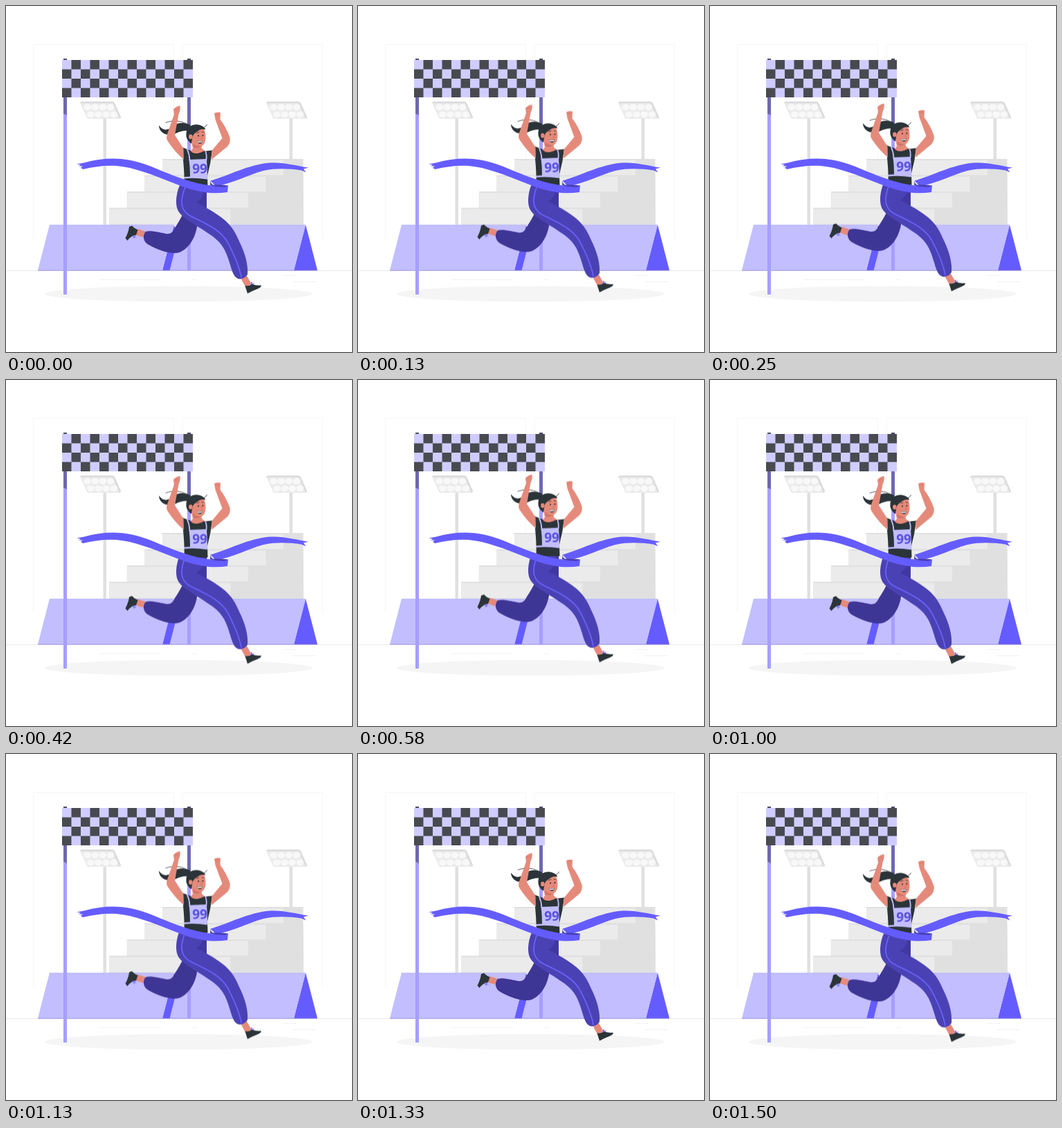
Animation, 500 px wide and 500 px high, one loop 1.54 s. Source, as an HTML page:

```html
<!DOCTYPE html>
<html lang="en">
<head>
<meta charset="utf-8">
<title>Finish line</title>
<style>
  html, body { margin: 0; width: 100%; height: 100%; overflow: hidden; background: #fff; }
  svg { display: block; width: 100vw; height: 100vh; }
  #runner { animation: bob 770ms linear -65ms infinite alternate; }
  @keyframes bob {
    from { transform: translateY(.8px); }
    to { transform: translateY(-9.2px); }
  }
  .skin { fill: #e58a7b; }
  .ink { fill: #2b3438; }
  .violet { fill: #655cff; }
  .pale { fill: #c2beff; }
  .line { fill: none; stroke-linecap: round; stroke-linejoin: round; }
  .bib { font: 700 19px "Noto Sans", "Open Sans", sans-serif; font-stretch: extra-condensed; text-anchor: middle; fill: #5a51da; }
</style>
</head>
<body>
<svg viewBox="0 0 500 500">
  <defs>
    <g id="lamp">
      <path fill="#e0e0e0" d="M140.5 160h4.5v156h-4.5z"/>
      <path fill="#dcdcdc" d="M107 139.5l2-1.5h45.500l2.500 2 9.500 21.500-2.500 1.500H118z"/>
      <path fill="#ebebeb" d="M107.500 140.500h46.500l10 22.500h-46z"/>
      <g id="bulbs" fill="#f8f8f8"></g>
    </g>
    <clipPath id="upper"><path d="M140 130h6v91h-6zM100 130h70v34h-70z"/></clipPath>
  </defs>

  <!-- backdrop -->
  <g fill="none" stroke="#f6f6f6">
    <path d="M39.500 337V55.500h203V337M255.500 337V55.500h202V337"/>
    <path stroke="#ebebeb" d="M0 382.500h500"/>
    <path stroke="#f2f2f2" d="M134 395.500h90M269 395.500h7M400 389.500h20M415 398.500h33"/>
  </g>
  <ellipse cx="249.500" cy="416" rx="193.500" ry="11.300" fill="#f5f5f5"/>
  <use href="#lamp"/>
  <g transform="translate(269)"><use href="#lamp" clip-path="url(#upper)"/></g>
  <g id="stand"></g>

  <!-- barrier -->
  <path class="violet" d="M243 316l17 66h-34zM433 316l17 66h-34z"/>
  <path class="pale" d="M63 316h180l-17 66H46zM253.500 316H433l-17 66H236.500z"/>
  <path stroke="#8e87df" stroke-width=".8" d="M46 382.200h404"/>

  <!-- gate -->
  <path fill="#a69fff" d="M262 76h5v306h-5zM83 76h5v341h-5z"/>
  <path fill="#6f68b0" d="M262 76h5v104h-5zM83 76h5v82l-5-2.500z"/>
  <path fill="#4b4b68" d="M262 76h5v3h-5zM83 76h5v3h-5z"/>
  <path fill="#d0ccff" d="M81 78h189v54H81z"/>
  <path id="checks" fill="#484a50"/>

  <g id="runner">
    <!-- ponytail -->
    <path class="ink" d="M266 172C256 167 247 169 241 174C234 180 227 181 221 172.500C221 180 227 186 236 186C247 186 252 178 265 181z"/>
    <path class="line" stroke="#2b3438" stroke-width=".8" d="M231 168.500C243 164 256 166 265 173"/>

    <!-- back leg -->
    <path class="skin" d="M190 322l12 4-2 9-12-4z"/>
    <path class="ink" d="M182 317.500Q186 322 190.500 323.500L188 331Q181 331.500 175.500 339L172.500 335.500Q177 327 178 319z"/>
    <path class="line" stroke="#655cff" stroke-width=".9" d="M183 331.500l2 4 .5-4 2 3"/>
    <path fill="#3e3695" d="M258 296Q250 312 244 320.500C241 327 238 330 231 329C220 327 208 324 202 326C197 331 198 341 206 345C222 354 240 360 252 355.500C264 350 275 335 277 312z"/>

    <!-- front leg -->
    <path class="skin" d="M339 393l9-3 7 12-9 4z"/>
    <path class="ink" d="M345.500 404.500Q352 405 355.500 401.500Q361 404.500 368.500 403.500Q370 406 363 409Q355 412 349 415.500z"/>
    <path class="line" stroke="#655cff" stroke-width=".9" d="M354 403l1-4 1.500 3.500 2-2"/>
    <path fill="#4a42b4" d="M251 259C245 273 244 290 250 298C257 308 276 317 296 331C312 342 318 353 324 374C328 389 332 395 339 394.500Q346 393 349 388C350 374 346 358 337 340C328 319 320 309 290 292L290 259z"/>
    <path fill="#4038a0" d="M290 262l-.5 30Q281 286 274 284Q284 281 287 262z"/>
    <path class="line" stroke="#6b63ff" stroke-width="1.700" d="M259 261C252 280 251 293 264 302C284 313 308 321 320 341C330 360 337 376 340 392"/>

    <!-- torso -->
    <path class="skin" d="M268 196h14l1 10 7 5-12 10-12-11 4-4z"/>
    <path class="ink" d="M254 204L266 208.500Q272 217 285 210L298 208.500Q296 227 291 245L291.500 262H257.500Q258 250 257 235Q256 218 254 204z"/>
    <path class="pale" d="M264.500 222L290 221Q291 235 291 250.500Q272 247.500 257 249.500L257 247L266 246.500Q266 233 264.500 222z"/>
    <path class="line" stroke="#c2beff" stroke-width="1.800" d="M262 207.500Q265 214 265.500 223M288.500 210.500Q290.500 216 289.300 223"/>
    <text class="bib" x="280" y="242.500">99</text>

    <!-- arms -->
    <path class="skin" d="M257 222Q244 211 233.500 195Q231 191 233 185L243 156.500L242 149.500Q245 145 251.500 144Q252.500 150 249.500 156L244 186.500L256.500 206z"/>
    <path class="skin" d="M297 222L320 203Q325 197 323.500 190Q318 175 309.500 164L310 154Q305 152.500 301 155L302.500 164L312.500 191L297.500 209z"/>
    <path class="line" stroke="#d0705f" stroke-width=".6" d="M244 150.500l5-2M303 157.500l5-1"/>

    <!-- head -->
    <path class="skin" d="M264 183Q267 173 280 174Q288 176 288.500 188Q289 199 283 202.500Q276 204 268.500 196z"/>
    <path fill="#cf7466" d="M270.500 198.500Q275 203 281 203Q277 207 271 204z"/>
    <path class="ink" d="M268 199Q259 193 260.500 183Q263 171 276 171.200Q285 172 288.500 178.500Q281 177 277 181Q271 184 269.500 189z"/>
    <ellipse class="skin" cx="266.800" cy="189" rx="2.700" ry="3.400"/>
    <path class="line" stroke="#2b3438" stroke-width=".8" d="M285 176Q289 175 290.500 171.500M275.500 183.500l3.500-1.300M283 182l2.700.6"/>
    <g class="ink">
      <ellipse cx="278" cy="187.500" rx=".9" ry="1.300"/>
      <ellipse cx="284.500" cy="187" rx=".9" ry="1.300"/>
      <path d="M275.500 194.500Q280 196.500 284 194.500Q283 199.500 279.500 199Q276.500 198 275.500 194.500z"/>
    </g>
    <path fill="#fff" d="M276 195Q280 196.800 283.500 195L283 196.800Q279.500 198 276.800 196.800z"/>
    <path class="line" stroke="#cf6556" stroke-width=".7" d="M282 187.500l1.500 4.500-2 .3"/>
  </g>

  <!-- ribbon -->
  <path class="violet" d="M102 228.500L113 226.500C150 216 180 220 210 232C245 247 278 259 300 259.500L321 259.500L320 269C296 273 272 268 245 257C212 244 185 233 160 231C143 230 128 232 111 236L108 233.500L111 231.500L105 231.500L108 229.500z"/>
  <path class="violet" d="M295.500 252.500C322 245 350 229 382 226.500C402 225.500 420 231 437 233.500L430 235.500L433.500 240.500L427 237.500C410 235 390 234 372 238C347 245 327 257 303 260z"/>
  <path fill="#473fb4" d="M295.500 252.500Q296 257 299 258.500Q310 257.500 321 259.500L316 261.500Q305 262 295 259z"/>
</svg>
<script>
  const $ = id => document.getElementById(id);
  const range = n => [...Array(n).keys()];
  const rect = (x, y, w, h, fill) =>
    `<rect x="${x}" y="${y}" width="${w}" height="${h}" fill="${fill}"/>`;

  // checkered banner: 14 x 4 cells
  const cell = 13.5;
  $('checks').setAttribute('d', range(56)
    .map(i => [i % 14, Math.floor(i / 14)])
    .filter(([c, r]) => (c + r) % 2)
    .map(([c, r]) => `M${81 + c * cell} ${78 + r * cell}h${cell}v${cell}h${-cell}z`)
    .join(''));

  $('stand').innerHTML = range(4).map(i => {
    const x = 226 - i * 25.6, y = 221 + i * 23.5;
    return rect(x, y, 429.5 - x, 316 - y, '#e0e0e0') + rect(x, y + 2, 175, 21.5, '#ebebeb');
  }).join('');

  $('bulbs').innerHTML = range(8).map(i => {
    const col = i % 4, row = Math.floor(i / 4);
    return `<ellipse cx="${117.5 + col * 11.2 + row * 4.8}" cy="${146.3 + row * 10.5}" rx="5.3" ry="4.6"/>`;
  }).join('');
</script>
</body>
</html>
```
